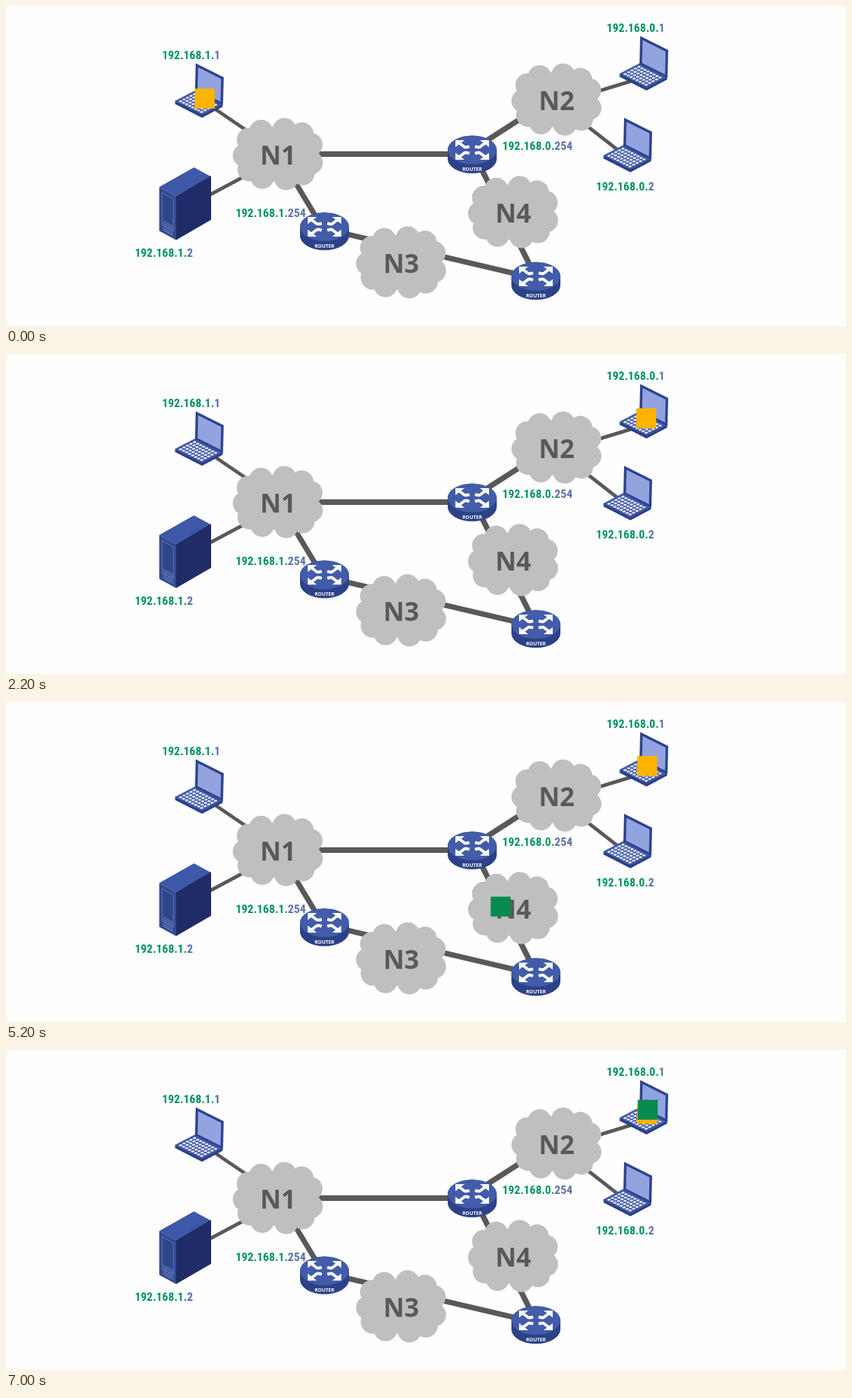
Animation, 1200 px wide and 458 px high, one loop 7200 ms. Source, as an HTML page with a canvas:

```html
<!DOCTYPE html>
<html lang="en">
<head>
<meta charset="utf-8">
<title>Packet routing</title>
<style>
html, body { margin: 0; width: 100%; height: 100%; overflow: hidden; background: #fefefe; }
canvas { display: block; }
</style>
</head>
<body>
<canvas id="stage" width="1200" height="458"></canvas>
<script>
const ctx = document.getElementById('stage').getContext('2d');
const LOOP = 7200, STEP = 200, PACKET = 28.5, DIGIT = 8.55;
const GREY = '#595959', GREEN = '#00935f', BLUE = '#5d70a9';

const nodes = {
  N1: [389, 212], N2: [787, 134], N3: [565, 367], N4: [725, 295],
  R1: [666, 212], R2: [455, 322], R3: [757, 393],
  L1: [276, 135], L2: [911, 96], L3: [888, 213], S1: [256, 283]
};
// ends, line width, vertical shift
const links = [
  ['L1', 'N1', 5, -3], ['S1', 'N1', 5, 6], ['N1', 'R1', 8, 0], ['N1', 'R2', 7.5, 0],
  ['R2', 'R3', 7.5, -3], ['R1', 'R3', 8, -5], ['R1', 'N2', 8, -6],
  ['N2', 'L2', 5, 6], ['N2', 'L3', 5, 4]
];
const labels = [
  ['192.168.1.', '1', 223, 69.5], ['192.168.1.', '2', 184, 352.5],
  ['192.168.1.', '254', 328, 296], ['192.168.0.', '254', 709, 200],
  ['192.168.0.', '1', 858, 31], ['192.168.0.', '2', 843, 257.5]
];
const home = [284, 132.5];
const packets = [
  { color: '#ffb400', shown: 0, start: 303, time: 1990,
    path: [home, 'N1', 'R1', 'N2', [916, 91.5]] },
  { color: '#078a50', shown: 3000, start: 3830, time: 3395,
    path: [home, 'N1', 'R2', 'N3', 'R3', [706, 291.5], 'R1', 'N2', [864, 111], [921, 83.5]] }
];
const place = p => nodes[p] || p;

function link(a, b, width, dy) {
  const [x1, y1] = nodes[a], [x2, y2] = nodes[b];
  ctx.beginPath();
  ctx.moveTo(x1, y1 + dy);
  ctx.lineTo(x2, y2 + dy);
  ctx.lineWidth = width;
  ctx.strokeStyle = GREY;
  ctx.stroke();
}

// Runs paint with the unit square mapped onto a slanted face.
function face(x, y, ux, uy, vx, vy, paint) {
  ctx.save();
  ctx.transform(ux, uy, vx, vy, x, y);
  paint();
  ctx.restore();
}

function rect(color, x = 0, y = 0, w = 1, h = 1) {
  ctx.fillStyle = color;
  ctx.fillRect(x, y, w, h);
}

function cloud(name) {
  const bumps = 11, bulge = v => Math.sign(v) * Math.abs(v) ** .8;
  ctx.fillStyle = '#bfbfbf';
  ctx.beginPath();
  ctx.ellipse(0, 0, 52, 40, 0, 0, 7);
  for (let i = 0; i < bumps; i++) {
    const a = (i / bumps) * 2 * Math.PI - 1.45;
    const x = 48 * bulge(Math.cos(a)), y = 35 * bulge(Math.sin(a));
    ctx.moveTo(x + 17, y);
    ctx.arc(x, y, 17, 0, 7);
  }
  ctx.fill();
  ctx.fillStyle = GREY;
  ctx.font = '700 37px "Open Sans", "Noto Sans", sans-serif';
  ctx.textAlign = 'center';
  ctx.fillText(name, -.5, 15);
}

function laptop() {
  for (let y = 5; y > 1; y--) face(-35, y, 39, 20, 30, -16, () => rect('#2b4187'));
  face(-35, 1, 39, 20, 29, -15, () => {
    rect('#4159a6');
    for (let i = 0; i < 8; i++)
      for (let j = 0; j < 5; j++) rect('#eef1fb', .08 + i * .11, .08 + j * .17, .075, .115);
  });
  face(-6, -13, 40, 20, 1, -40, () => {
    rect('#2c438d');
    rect('#93a3e0', .09, .08, .82, .82);
  });
}

function server() {
  face(-37, -24, 24, 13, 49.5, -28, () => rect('#3d58a8'));
  face(-13, -11, 50, -29, 0, 63, () => rect('#202c67'));
  face(-37, -24, 24, 13, 0, 63, () => {
    rect('#344a92');
    rect('#6478b8', .14, .09, .72, .74);
    rect('#30468c', .18, .105, .64, .71);
    for (let i = 0; i < 5; i++) rect('#7e90c7', .22, .72 + i * .05, .6, .016);
  });
}

function arrow(sx, sy) {
  ctx.save();
  ctx.scale(sx, sy);
  ctx.beginPath();
  ctx.moveTo(-19, -10);
  ctx.bezierCurveTo(-10, -5, -13, -2, -4, -5);
  ctx.lineWidth = 4.2;
  ctx.strokeStyle = ctx.fillStyle = '#fff';
  ctx.stroke();
  ctx.beginPath();
  ctx.moveTo(-24, -14);
  ctx.lineTo(-11, -14);
  ctx.lineTo(-24, -4);
  ctx.fill();
  ctx.restore();
}

function router() {
  ctx.translate(0, -6);
  ctx.fillStyle = '#2c4288';
  ctx.beginPath();
  ctx.ellipse(0, 0, 35, 20.5, 0, Math.PI, 0);
  ctx.ellipse(0, 13, 35, 20.5, 0, 0, Math.PI);
  ctx.fill();
  ctx.fillStyle = '#425ca9';
  ctx.beginPath();
  ctx.ellipse(0, 0, 35, 20.5, 0, 0, 7);
  ctx.fill();
  for (const sx of [-1, 1]) for (const sy of [-1, 1]) arrow(sx, sy);
  ctx.fillStyle = '#fff';
  ctx.font = '700 7px "Open Sans", sans-serif';
  ctx.textAlign = 'center';
  ctx.fillText('ROUTER', 0, 29.5);
}

// Picks the font size from the digit width, so narrow faces come out taller.
function labelSize() {
  labelFont(100);
  return 100 * DIGIT / ctx.measureText('0').width;
}

function labelFont(size) {
  ctx.font = `bold ${size}px "Liberation Sans Narrow", "Roboto Condensed", "Liberation Sans", Arial, sans-serif`;
}

function label([net, host, x, y]) {
  const size = labelSize();
  labelFont(size);
  ctx.textAlign = 'left';
  ctx.fillStyle = GREEN;
  ctx.fillText(net, x, y + size * .36);
  ctx.fillStyle = BLUE;
  ctx.fillText(host, x + ctx.measureText(net).width, y + size * .36);
}

function along(path, f) {
  const pts = path.map(place);
  const len = i => Math.hypot(pts[i + 1][0] - pts[i][0], pts[i + 1][1] - pts[i][1]);
  let left = 0, i = 0;
  for (let k = 0; k < pts.length - 1; k++) left += len(k) * f;
  while (i < pts.length - 2 && left > len(i)) left -= len(i++);
  const k = left / len(i);
  return [0, 1].map(c => pts[i][c] + (pts[i + 1][c] - pts[i][c]) * k);
}

function packet({ color, shown, start, time, path }, t) {
  if (t < shown) return;
  const u = Math.min(1, Math.max(0, (t - start) / time));
  const [x, y] = along(path, u * (2 - u));
  rect(color, x - PACKET / 2, y - PACKET / 2, PACKET, PACKET);
}

const kinds = { N: cloud, R: router, L: laptop, S: server };

function draw(t) {
  rect('#fefefe', 0, 0, 1200, 458);
  links.forEach(l => link(...l));
  for (const name in nodes) {
    ctx.save();
    ctx.translate(...nodes[name]);
    kinds[name[0]](name);
    ctx.restore();
  }
  labels.forEach(label);
  packets.forEach(p => packet(p, t));
}

const begin = performance.now();
function tick() {
  const t = (performance.now() - begin) % LOOP;
  draw(Math.floor(t / STEP) * STEP);
  requestAnimationFrame(tick);
}
tick();
</script>
</body>
</html>
```
